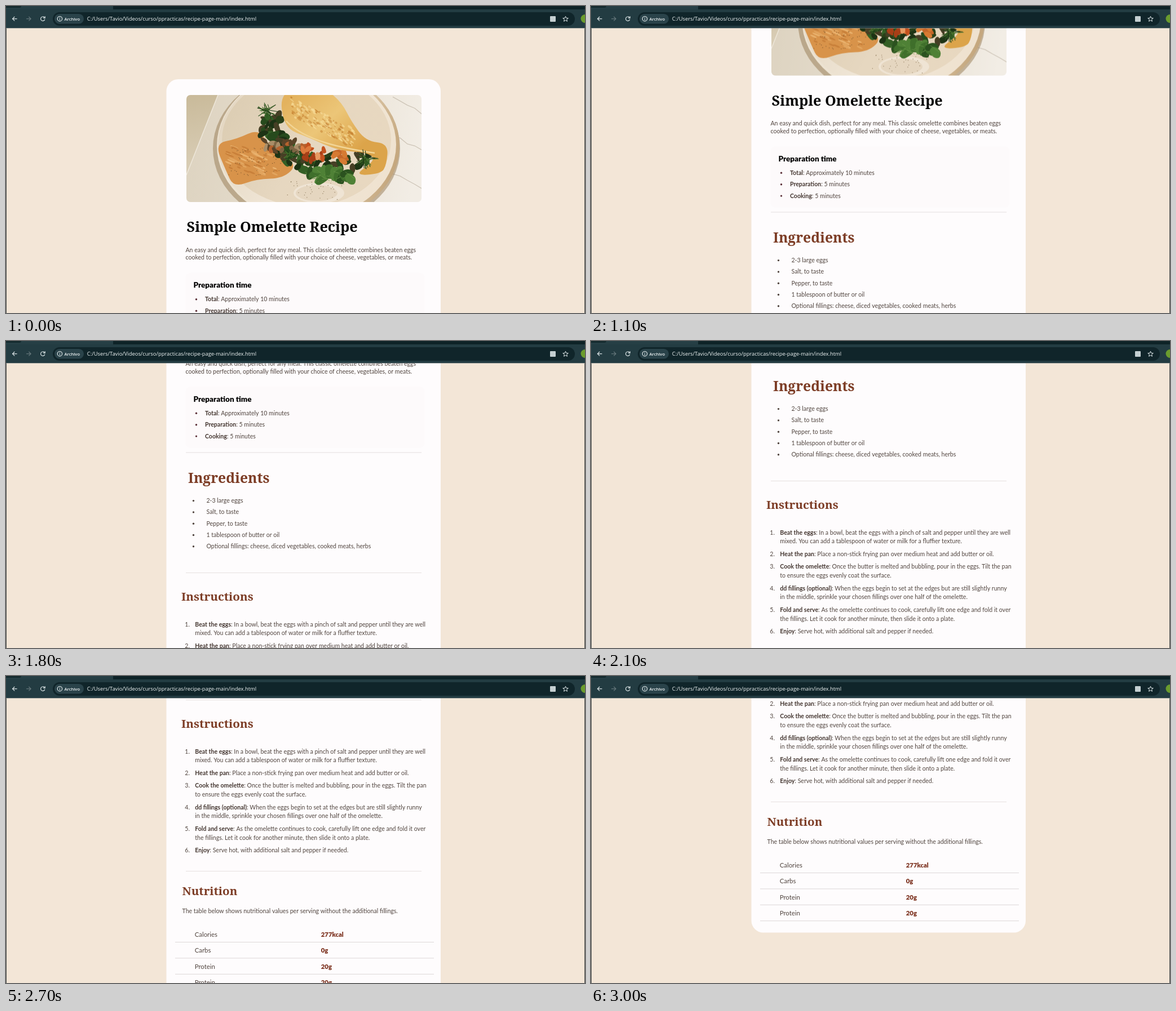
An HTML page with a canvas for the animation above (4600 ms loop, 1027 by 545 pixels).

```html
<!DOCTYPE html>
<html lang="en">
<head>
<meta charset="utf-8">
<title>Recipe page</title>
<style>
html, body { margin: 0; width: 100%; height: 100%; overflow: hidden; background: #f3e6d7; }
canvas { display: block; }
</style>
</head>
<body>
<canvas id="stage" width="1027" height="545"></canvas>
<script>
const W = 1027, H = 545, LOOP = 4600, STEP = 100, BAR = 39;
const TAU = Math.PI * 2;
const ctx = document.getElementById('stage').getContext('2d');

// Each flick of the wheel eases the page on by a distance.
const flicks = [
  { start: 823, duration: 463, distance: 347.5 },
  { start: 1676, duration: 413, distance: 208 },
  { start: 2396, duration: 520, distance: 329 }
];

const clamp = p => Math.min(1, Math.max(0, p));
const ease = p => p * p * (3 - 2 * p);

function scrollAt(time) {
  const t = Math.floor(time / STEP) * STEP;
  // Pages move only from the first step inside a flick
  const sum = flicks.reduce((y, f) => y + f.distance * ease(clamp((t - f.start) / f.duration)), 0);
  return Math.round(sum * 2) / 2;
}

const INK = '#51453f', RUST = '#7d3d26';
const sans = (size, weight = 400) => `${weight} ${size}px Lato, sans-serif`;
const serif = size => `700 ${size}px "Noto Serif", serif`;
const ui = (size, weight = 400) => `${weight} ${size}px "Open Sans", sans-serif`;

function text(str, x, y, font = sans(10.55), color = INK) {
  ctx.font = font;
  ctx.fillStyle = color;
  ctx.fillText(str, x, y);
  return x + ctx.measureText(str).width;
}

function labelled(label, rest, x, y) {
  text(rest, text(label, x, y, sans(10.55, 700), '#43352f'), y);
}

function box(g, x, y, w, h, r, color) {
  g.beginPath();
  g.roundRect(x, y, w, h, r);
  g.fillStyle = color;
  g.fill();
}

function dot(g, x, y, rx, ry, color, angle = 0) {
  g.beginPath();
  g.ellipse(x, y, rx, ry, angle, 0, TAU);
  g.fillStyle = color;
  g.fill();
}

function line(g, points, color, width = 1) {
  g.beginPath();
  points.forEach(([x, y]) => g.lineTo(x, y));
  g.strokeStyle = color;
  g.lineWidth = width;
  g.stroke();
}

// Closed smooth outline through the midpoints of a few points
function blob(g, points, color) {
  const mid = (a, b) => [(a[0] + b[0]) / 2, (a[1] + b[1]) / 2];
  g.beginPath();
  g.moveTo(...mid(points.at(-1), points[0]));
  points.forEach((p, i) => g.quadraticCurveTo(...p, ...mid(p, points[(i + 1) % points.length])));
  g.fillStyle = color;
  g.fill();
}

function gradient(g, x0, y0, x1, y1, ...colors) {
  const fill = g.createLinearGradient(x0, y0, x1, y1);
  colors.forEach((c, i) => fill.addColorStop(i / (colors.length - 1), c));
  return fill;
}

function seeded(seed) {
  return () => {
    seed = (seed * 1664525 + 1013904223) % 4294967296;
    return seed / 4294967296;
  };
}

function paintDish() {
  const photo = document.createElement('canvas');
  photo.width = 417;
  photo.height = 190;
  const g = photo.getContext('2d'), rand = seeded(11);
  const spread = size => (rand() - 0.5) * 2 * size;
  const pick = list => list[Math.floor(rand() * list.length)];

  function repeat(count, paint) {
    for (let i = 0; i < count; i++) paint(i / count);
  }

  // A ragged round shape for leaves and chunks
  function chunk(x, y, rx, ry, color) {
    const turn = rand() * TAU;
    blob(g, Array.from({ length: 7 }, (_, i) => {
      const a = i * TAU / 7, r = 0.8 + rand() * 0.6;
      const u = rx * r * Math.cos(a), v = ry * r * Math.sin(a);
      return [x + u * Math.cos(turn) - v * Math.sin(turn), y + u * Math.sin(turn) + v * Math.cos(turn)];
    }), color);
  }

  function dill(x, y, size) {
    repeat(30, () => {
      const a = rand() * TAU, r = size * (0.4 + rand() * 0.7);
      line(g, [[x + spread(4), y + spread(4)], [x + r * Math.cos(a), y + r * 0.75 * Math.sin(a)]],
        pick(['#2d5420', '#4c7530', '#1f3b17']), 1.1);
    });
  }

  // Table and marble
  g.fillStyle = gradient(g, 0, 0, 417, 60, '#ddd3c0', '#e6ddce', '#f2ede5');
  g.fillRect(0, 0, 417, 190);
  g.beginPath();
  g.lineTo(0, 0); g.lineTo(56, 0); g.lineTo(0, 142);
  g.fillStyle = gradient(g, 0, 0, 20, 120, '#c9ba9a', '#d8ccb4');
  g.fill();
  line(g, [[56, 0], [0, 142]], '#eee7da', 1.5);
  repeat(3, k => line(g, Array.from({ length: 5 }, (_, i) =>
    [366 + i * 13, 5 + k * 200 + i * 7 + spread(3)]), '#cdc4b7', 1.3));

  // Plate, from its shadow inwards
  dot(g, 213, 95, 166, 137, 'rgba(150,122,82,.5)');
  dot(g, 216, 90, 162, 135, gradient(g, 150, 60, 378, 130, '#ede3d2', '#e2d0b4', '#c2a47a'));
  dot(g, 214, 88, 158, 131, gradient(g, 60, 20, 360, 150, '#e3d6c1', '#f1e7d8', '#efe2cf'));
  dot(g, 213, 80, 150, 118, gradient(g, 70, 20, 340, 160, '#dccdb3', '#e6d7c0', '#e8d8c0'));
  dot(g, 235, 174, 45, 18, '#efe4d4');
  dot(g, 231, 174, 37, 14, '#e5d6c0');

  // Spread
  blob(g, [[50, 86], [90, 78], [128, 60], [146, 90], [198, 122], [172, 148], [125, 149],
    [84, 164], [70, 134]], '#d8934a');
  repeat(60, () => {
    const x = 72 + rand() * 90, y = 90 + rand() * 46 + (x - 72) * 0.08;
    dot(g, x, y, 3 + rand() * 6, 1.5, pick(['#e2a55f', '#e9b16d', '#c9803a']), 0.4);
  });

  // Filling heaped along a curve from upper left to lower right
  const heap = u => {
    const v = 1 - u, along = (a, b, c, d) => a * v ** 3 + 3 * b * v * v * u + 3 * c * v * u * u + d * u ** 3;
    return [along(146, 146, 200, 325), along(28, 110, 140, 112)];
  };
  repeat(90, u => {
    const [x, y] = heap(u);
    chunk(x + spread(19), y + spread(15), 5 + rand() * 8, 3 + rand() * 5,
      pick(['#1d3315', '#274a1d', '#345f25', '#2a4019', '#463f25']));
  });
  repeat(18, u => {
    const x = 220 + u * 75;
    chunk(x, 142 + spread(9), 12, 7, pick(['#2b521f', '#3f6f2b', '#4f8136']));
    line(g, [[x - 9, 143 + spread(10)], [x + 9, 143 + spread(10)]], '#6f9a4c', 0.7);
  });
  repeat(24, u => chunk(138 + u * 75, 90 + spread(9), 7, 4, pick(['#7d6544', '#a98d68', '#5a4429', '#b5622e'])));
  repeat(18, () => chunk(226 + spread(20), 103 + spread(13), 7, 4, pick(['#c4521f', '#dd7a3c', '#a83f17', '#e79a62'])));
  repeat(6, () => chunk(274 + spread(12), 110 + spread(9), 9, 5, pick(['#d67a32', '#c4672a'])));

  // Folded omelette
  blob(g, [[166, -12], [246, -12], [276, 14], [292, 46], [318, 82], [358, 86], [355, 124], [345, 140],
    [296, 143], [336, 116], [322, 102], [270, 99], [218, 76], [172, 58]],
    gradient(g, 190, 0, 290, 110, '#e3b25e', '#ecc678', '#dca44a'));
  repeat(160, () => {
    const u = rand(), x = 186 + u * 112, y = 3 + u * 68 + rand() * 34 - u * 10;
    dot(g, x, y, 1 + rand() * 4, 0.7 + rand() * 1.5, pick(['rgba(190,118,38,.45)', 'rgba(248,220,152,.65)']), 0.7);
  });
  g.beginPath();
  g.moveTo(177, 46);
  g.bezierCurveTo(210, 82, 280, 95, 334, 103);
  g.strokeStyle = '#f2d596';
  g.lineWidth = 2.5;
  g.stroke();

  dill(144, 29, 20);
  dill(316, 113, 23);
  dill(184, 106, 13);
  repeat(70, () => dot(g, 75 + rand() * 95, 92 + rand() * 52, 0.7, 0.6, '#76522b'));
  repeat(38, () => dot(g, 165 + rand() * 125, 153 + rand() * 33, 0.7, 0.6, '#857051'));
  return photo;
}

const dish = paintDish();

const times = [['Total', ': Approximately 10 minutes'], ['Preparation', ': 5 minutes'], ['Cooking', ': 5 minutes']];
const ingredients = ['2-3 large eggs', 'Salt, to taste', 'Pepper, to taste', '1 tablespoon of butter or oil',
  'Optional fillings: cheese, diced vegetables, cooked meats, herbs'];
// [label, first line, second line]
const instructions = [
  ['Beat the eggs', ': In a bowl, beat the eggs with a pinch of salt and pepper until they are well',
    'mixed. You can add a tablespoon of water or milk for a fluffier texture.'],
  ['Heat the pan', ': Place a non-stick frying pan over medium heat and add butter or oil.'],
  ['Cook the omelette', ': Once the butter is melted and bubbling, pour in the eggs. Tilt the pan',
    'to ensure the eggs evenly coat the surface.'],
  ['dd fillings (optional)', ': When the eggs begin to set at the edges but are still slightly runny',
    'in the middle, sprinkle your chosen fillings over one half of the omelette.'],
  ['Fold and serve', ': As the omelette continues to cook, carefully lift one edge and fold it over',
    'the fillings. Let it cook for another minute, then slide it onto a plate.'],
  ['Enjoy', ': Serve hot, with additional salt and pepper if needed.']
];
const nutrition = [['Calories', '277kcal'], ['Carbs', '0g'], ['Protein', '20g'], ['Protein', '20g']];

function rule(y, x0 = 319, x1 = 737, color = '#e6e0df') {
  ctx.fillStyle = color;
  ctx.fillRect(x0, y - 0.5, x1 - x0, 1);
}

function drawIntro() {
  ctx.save();
  ctx.beginPath();
  ctx.roundRect(320, 158, 417, 190, 7);
  ctx.clip();
  ctx.drawImage(dish, 320, 158);
  ctx.restore();
  text('Simple Omelette Recipe', 320.5, 401, serif(25.2), '#000');
  text('An easy and quick dish, perfect for any meal. This classic omelette combines beaten eggs', 318.5, 436.5);
  text('cooked to perfection, optionally filled with your choice of cheese, vegetables, or meats.', 318.5, 450);
}

function drawTimes() {
  box(ctx, 318.5, 473.5, 424, 109, 9, '#fdfafb');
  text('Preparation time', 332.5, 500, sans(13.5, 900), '#000');
  times.forEach(([label, rest], i) => {
    const y = 524.2 + i * 20.4;
    dot(ctx, 337.5, y - 3.4, 1.7, 1.7, '#5c3038');
    labelled(label, rest, 353, y);
  });
  rule(590.5);
}

function drawIngredients() {
  text('Ingredients', 323, 644, serif(24.7), RUST);
  ingredients.forEach((item, i) => {
    const y = 679.5 + i * 20.3;
    dot(ctx, 332.5, y - 3.4, 1.7, 1.7, INK);
    text(item, 355.5, y);
  });
  rule(804);
}

function drawInstructions() {
  text('Instructions', 311, 853.8, serif(20.6), RUST);
  let y = 899.2;
  instructions.forEach(([label, first, second], i) => {
    text(`${i + 1}.`, 317.3, y);
    labelled(label, first, 335.3, y);
    if (second) text(second, 335.3, y + 15.6);
    y += second ? 38.3 : 22.4;
  });
  rule(1108);
}

function drawNutrition() {
  text('Nutrition', 312.5, 1150.3, serif(20.5), RUST);
  text('The table below shows nutritional values per serving without the additional fillings.', 312.5, 1182.6);
  nutrition.forEach(([name, value], i) => {
    const y = 1224.3 + i * 28.4;
    text(name, 334.7, y, sans(11.4));
    text(value, 558.8, y, sans(11.3, 900), '#7a2e1b');
    rule(y + 9.7, 300, 759, '#dcd8d8');
  });
}

function drawPage(scroll) {
  ctx.save();
  ctx.beginPath();
  ctx.rect(0, BAR, W, H - BAR);
  ctx.clip();
  ctx.fillStyle = '#f3e6d7';
  ctx.fillRect(0, BAR, W, H - BAR);
  ctx.translate(0, -scroll);
  box(ctx, 284.5, 130, 486.5, 1210, 21, '#fefcfd');
  drawIntro();
  drawTimes();
  drawIngredients();
  drawInstructions();
  drawNutrition();
  ctx.restore();

  ctx.fillStyle = '#44494a';
  ctx.fillRect(0, BAR, 1, H - BAR);
  ctx.fillRect(W - 1, BAR, 1, H - BAR);
}

function drawArrow(x, way, color) {
  const y = 22.7, tip = x + way * 4;
  line(ctx, [[x - way * 4, y], [tip, y]], color, 1.2);
  line(ctx, [[tip - way * 3.7, y - 3.7], [tip, y], [tip - way * 3.7, y + 3.7]], color, 1.2);
}

function drawBrowserBar() {
  const light = '#dfe8e9';
  ctx.fillStyle = '#0e2327';
  ctx.fillRect(0, 0, W, BAR);
  box(ctx, -10, -10, 200, 20, 4, '#263f45');
  box(ctx, -10, -8, 37, 11, 3, '#142a2e');
  ctx.fillStyle = '#233c42';
  ctx.fillRect(0, 6, W, BAR - 6);
  ctx.fillStyle = '#80898a';
  ctx.fillRect(0, BAR, W, 0.6);
  box(ctx, 83, 11, 926, 24, 12, '#10252a');
  box(ctx, 86, 14, 52, 17.5, 8.75, '#2a434a');

  drawArrow(15.6, -1, light);
  drawArrow(40.1, 1, '#67787c');
  ctx.strokeStyle = light;
  ctx.beginPath();
  ctx.arc(65.3, 22.7, 3.7, 0.3, 5.6);
  ctx.stroke();
  line(ctx, [[69.2, 18.3], [69.2, 21.3], [66.2, 21.3]], light, 1.2);

  ctx.beginPath();
  ctx.arc(95.4, 22.7, 4.2, 0, TAU);
  ctx.stroke();
  line(ctx, [[95.4, 22], [95.4, 25]], light);
  line(ctx, [[95.4, 20], [95.4, 21.1]], light);
  text('Archivo', 103.5, 25.5, ui(7.6, 600), '#f1f6f6');
  text('C:/Users/Tavio/Videos/curso/ppracticas/recipe-page-main/index.html', 143.8, 26.2, ui(9.38), '#f1f6f6');

  box(ctx, 965, 18, 10, 10, 1, '#c4cfd1');
  const star = Array.from({ length: 11 }, (_, i) => {
    const a = i * Math.PI / 5, r = i % 2 ? 2.2 : 5;
    return [992.5 + r * Math.sin(a), 23.2 - r * Math.cos(a)];
  });
  line(ctx, star, light);
  dot(ctx, 1027, 22.5, 7.5, 7.5, '#6b9c2e');
}

function frame() {
  drawPage(scrollAt(performance.now() % LOOP));
  drawBrowserBar();
  requestAnimationFrame(frame);
}
frame();
</script>
</body>
</html>
```
